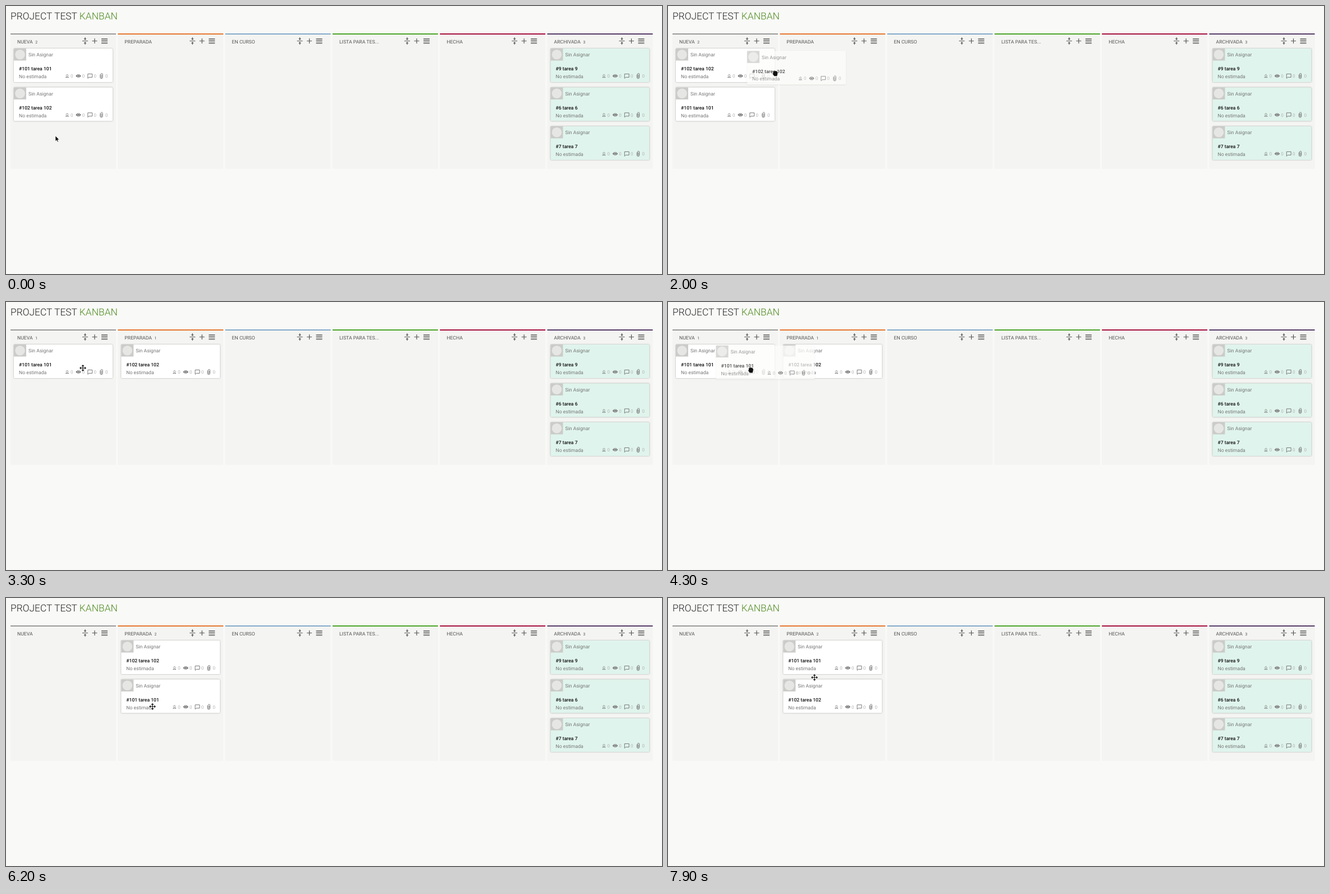
Write an HTML page that moves like this. It is 1169 px wide and 479 px high and loops after 8 s.

```html
<!DOCTYPE html>
<html lang="es">
<head>
<meta charset="utf-8">
<title>Kanban</title>
<style>
  html, body { margin: 0; width: 100%; height: 100%; overflow: hidden; background: #f9f9f7; }
  svg { display: block; width: 1169px; height: 479px; }
  text { font: 400 8.7px Roboto, sans-serif; text-rendering: geometricPrecision; white-space: pre; }
  .title { font-size: 17.4px; font-weight: 300; fill: #222; }
  .title tspan { fill: #4d8a1f; }
  .head { fill: #555; }
  .count { font-size: 6.9px; }
  .soft { fill: #767676; }
  .task { font-size: 8.6px; font-weight: 500; fill: #111; }
  .zero { font-size: 8.1px; fill: #b4b4b4; }
  .paper { filter: drop-shadow(0 .8px .8px rgba(0, 0, 0, .34)); }
  .ghost { opacity: .74; }
  .ghost .paper { filter: drop-shadow(0 1px 1px rgba(0, 0, 0, .1)); }
</style>
</head>
<body>
<svg id="stage" viewBox="0 0 1169 479">
  <defs>
    <g id="tools" fill="none" stroke="#555" stroke-width="1.2">
      <path d="M128 13.500H138M133 7V10M133 17V20M145.500 13.500H154.500M150 9V18"/>
      <path d="M130.500 9.300H135.500L133 12ZM130.500 17.700H135.500L133 15Z" fill="#555" stroke="none"/>
      <path d="M162 9.600H173M162 12.300H173M162 15H173M162 17.700H173"/>
    </g>
    <g id="meta" fill="none" stroke="#777">
      <path d="M92.500 48.700L95 46.300L97.500 48.700M92.300 51.700H97.700L95 49.300Z" stroke-width=".9"/>
      <path d="M110.300 49Q115 42.800 119.700 49Q115 55.200 110.300 49Z" fill="#666" stroke="none"/>
      <circle cx="115" cy="49" r="1.900" fill="#666" stroke="#fff" stroke-width=".8"/>
      <path d="M131.800 45.400H139.700V51.400H134L131.800 53.300Z"/>
      <path d="M153.800 46.500V51.500A2.200 2.200 0 0 0 158.200 51.500V46A1.600 1.600 0 0 0 155 46V51.200A1 1 0 0 0 157 51.200V46.800" stroke-width=".9"/>
    </g>
    <path id="arrow" d="M0 0V9.700L2.200 7.700L3.800 11L5.400 10.300L3.900 7.100H6.900Z" fill="#000" stroke="#fff" stroke-width=".7"/>
    <g id="move">
      <path d="M0-6.500L6.500 0L0 6.500L-6.500 0Z" fill="#fff"/>
      <path id="tip" d="M-2.600-3.200L0-6L2.600-3.200ZM-.6-3.200H.6V0H-.6Z" fill="#111"/>
      <use href="#tip" transform="rotate(90)"/>
      <use href="#tip" transform="rotate(180)"/>
      <use href="#tip" transform="rotate(270)"/>
    </g>
    <path id="fist" transform="scale(1.2)" d="M-3.200-2Q-2.500-4-1.300-3Q-.3-4.600.7-3.200Q2.500-4 2.800-2.300Q4-2 3.500.8L2.700 4H-1.500L-3.700 1Q-4-.2-2.700-.3Z"
      fill="#111" stroke="#fff" stroke-width=".5" paint-order="stroke"/>
  </defs>
  <text class="title" x="8" y="24">PROJECT TEST <tspan>KANBAN</tspan></text>
  <g id="board"></g>
  <g id="cards"></g>
  <g id="cursor"></g>
</svg>
<script>
const LOOP = 8000, STEP = 100;
const PITCH = 191.3, TOP = 76, ROW = 69.5;
const $ = id => document.getElementById(id);
const clamp = k => Math.max(0, Math.min(1, k));
const colX = i => 8 + i * PITCH;
const at = (x, y, body, cls = '') => `<g class="${cls}" transform="translate(${x} ${y})">${body}</g>`;
const use = id => `<use href="#${id}"/>`;

const columns = [
  ['NUEVA', '#999'], ['PREPARADA', '#e6772e'], ['EN CURSO', '#84aacb'],
  ['LISTA PARA TES...', '#4ba527'], ['HECHA', '#a60f3d'], ['ARCHIVADA', '#553a66']
];

// Pointer glides: start, end, destination, sideways bulge
const home = { x: 88, y: 232 };
const glides = [
  { from: 0, to: 900, x: 85, y: 170, bulge: 29 },
  { from: 900, to: 1200, x: 75, y: 181 },
  { from: 1400, to: 2300, x: 249, y: 90 },
  { from: 2300, to: 2600, x: 239, y: 79 },
  { from: 2700, to: 3100, x: 219, y: 102 },
  { from: 3200, to: 3300, x: 137, y: 118 },
  { from: 3300, to: 3900, x: 77, y: 122 },
  { from: 4000, to: 4800, x: 265, y: 121 },
  { from: 5400, to: 5800, x: 266, y: 151 },
  { from: 5900, to: 6200, x: 261, y: 194 },
  { from: 6500, to: 7000, x: 267, y: 116 },
  { from: 7200, to: 7900, x: 261, y: 142 }
];

// dx, dy: where the pointer holds the card
const drags = [
  { id: 102, from: 1500, to: 2800, dx: 50, dy: 40 },
  { id: 101, from: 4100, to: 5000, dx: 62, dy: 44 },
  { id: 101, from: 6600, to: 7300, dx: 56, dy: 48 }
];

function pointer(t) {
  let { x, y } = home;
  for (const g of glides) {
    if (t < g.from) break;
    const k = clamp((t - g.from) / (g.to - g.from));
    x += (g.x - x) * k + (g.bulge || 0) * Math.sin(Math.PI * k);
    y += (g.y - y) * k;
  }
  return { x, y };
}

// A dragged card takes the row under it, or the end of a column it enters.
function place(board, drag, t) {
  const p = pointer(Math.min(t, drag.to - STEP));
  const col = p.x < colX(1) ? 0 : 1;
  const entering = !board[col].includes(drag.id);
  const row = Math.max(0, Math.round((p.y - drag.dy - TOP) / ROW));
  const next = board.map(ids => ids.filter(id => id !== drag.id));
  next[col].splice(entering ? next[col].length : row, 0, drag.id);
  return next;
}

const boardAt = (t, done) =>
  drags.filter(d => t >= (done ? d.to : d.from)).reduce((b, d) => place(b, d, t), [[101, 102], []]);

function card(id, fill) {
  const zeros = [0, 1, 2, 3].map(i => `<text class="zero" x="${101 + i * 20.7}" y="52">0</text>`).join('');
  return `<rect class="paper" width="176" height="60" rx="1.5" fill="${fill}"/>
    <rect width="22" height="21.500" fill="#cbcbc9"/><circle cx="11" cy="10.700" r="8.800" fill="#e6e6e4"/>
    <text class="soft" x="26" y="14.200">Sin Asignar</text>
    <text class="task" x="9" y="39.200">#${id} tarea ${id}</text>
    <text class="soft" x="9" y="53">No estimada</text>${use('meta')}${zeros}`;
}

const stack = (col, ids, fill) =>
  ids.map((id, row) => at(colX(col) + 6, TOP + row * ROW, card(id, fill))).join('');

function column([name, color], i) {
  return at(colX(i), 49, `<rect width="188" height="242" fill="#f4f4f2"/>
    <rect width="188" height="2" fill="${color}"/>
    <text class="head" x="12" y="17.800">${name}<tspan class="count" dx="4.500" id="count${i}"></tspan></text>
    ${use('tools')}`);
}

function render(t) {
  const drag = drags.find(d => t >= d.from && t < d.to);
  const p = pointer(t);
  const shape = drag ? 'fist' : t < 300 ? 'arrow' : 'move';
  let html = boardAt(t).map((ids, col) => stack(col, ids, '#fff')).join('');
  if (drag) html += at(p.x - drag.dx, p.y - drag.dy, card(drag.id, '#fdfdfb'), 'ghost');
  boardAt(t, true).forEach((ids, col) => { $('count' + col).textContent = ids.length || ''; });
  $('cards').innerHTML = html;
  $('cursor').innerHTML = at(p.x, p.y, use(shape));
}

$('board').innerHTML = columns.map(column).join('') + stack(5, [9, 6, 7], '#dff4ec');
$('count5').textContent = 3;

const start = performance.now();
let shown = -1;
function tick() {
  const t = Math.floor((performance.now() - start) % LOOP / STEP) * STEP;
  if (t !== shown) render(shown = t);
  requestAnimationFrame(tick);
}
tick();
</script>
</body>
</html>
```
